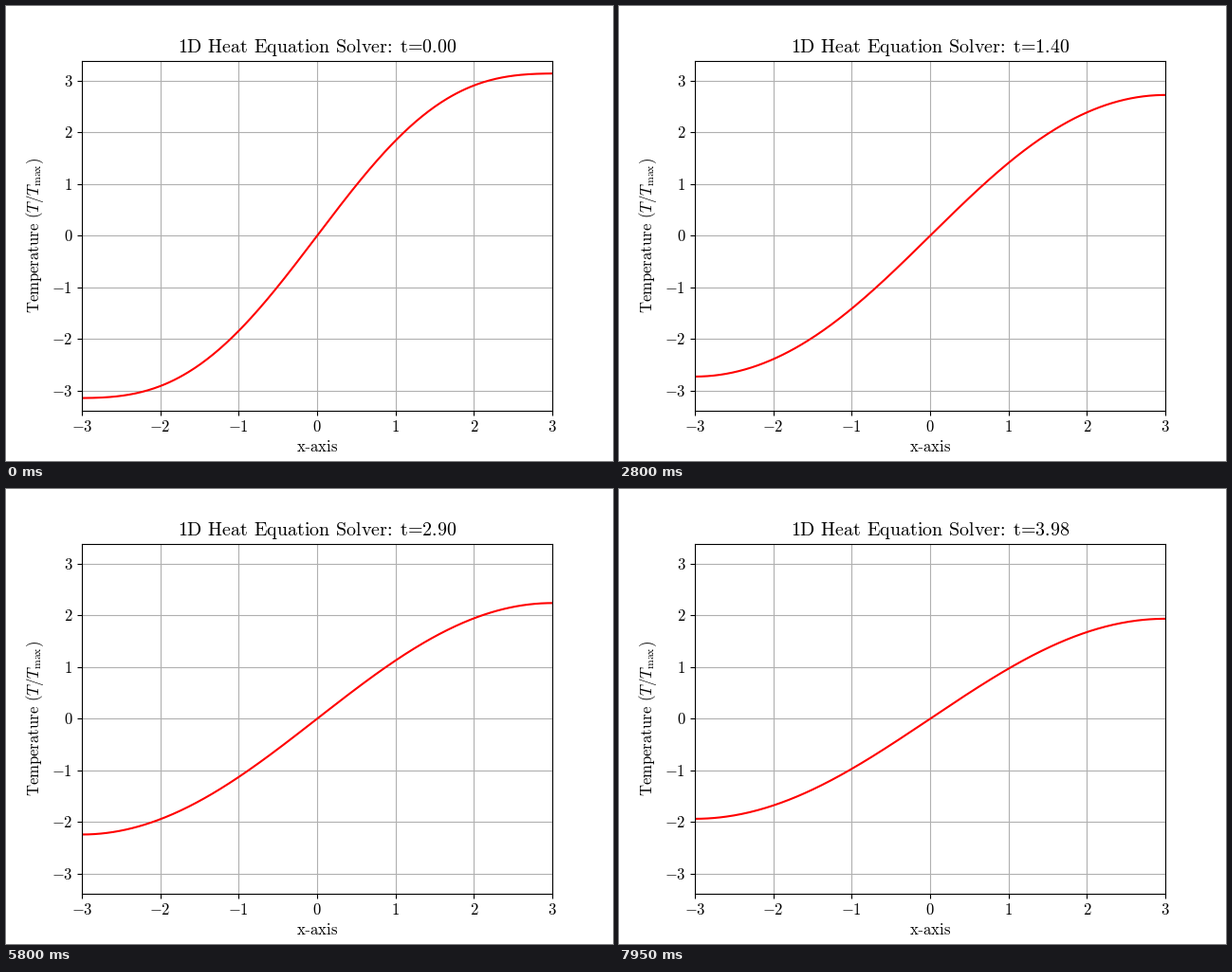
A matplotlib script for the animation above (8000 ms loop, 640x480 px).

```python
import numpy as np
import matplotlib.pyplot as plt
from matplotlib.animation import FuncAnimation
from matplotlib.ticker import FuncFormatter

plt.rcParams.update({
    "font.family": "Liberation Serif",
    "font.size": 12,
    "mathtext.fontset": "cm",
})

FRAMES = 160
STEP_MS = 50
L = 3.0        # half length of the rod
ALPHA = 0.5    # diffusivity
GAP = r"\hspace{0.38}"
TIGHT = r"\hspace{-0.2}"

x = np.linspace(-L, L, 301)

# Insulated ends: expand x + sin(x) in odd sine modes
n = np.arange(40)
k = (2 * n + 1) * np.pi / (2 * L)
coef = (2 / L) * (
    (-1.0) ** n / k**2
    + 0.5 * (np.sin((1 - k) * L) / (1 - k) - np.sin((1 + k) * L) / (1 + k))
)
modes = np.sin(np.outer(x, k))


def temperature(t):
    if t == 0:
        return x + np.sin(x)
    return modes @ (coef * np.exp(-ALPHA * k**2 * t))


def roman(text):
    return r"\mathrm{" + text.replace(" ", GAP) + "}"


def title_text(t):
    colon = TIGHT + ":" + r"\hspace{0.306}"
    equals = TIGHT + "=" + TIGHT
    return "$" + roman(f"1D Heat Equation Solver{colon}t{equals}{t:.2f}") + "$"


fig, ax = plt.subplots(figsize=(6.4, 4.8), dpi=100)
ax.set_xlim(-L, L)
ax.set_ylim(-3.391, 3.391)
ax.grid(True)
ax.set_xlabel("$" + roman("x") + "$-$" + roman("axis") + "$")
ax.set_ylabel("$" + roman("Temperature ") + r"(T/T_{\mathrm{max}})$")
for axis in (ax.xaxis, ax.yaxis):
    axis.set_ticks(range(-3, 4))
    axis.set_major_formatter(FuncFormatter(lambda v, _: f"${v:.0f}$"))

line, = ax.plot(x, temperature(0), color="red", lw=1.5)
title = ax.set_title(title_text(0))


def update(i):
    t = i / 40
    line.set_ydata(temperature(t))
    title.set_text(title_text(t))
    return line, title


anim = FuncAnimation(fig, update, frames=FRAMES, interval=STEP_MS,
                     repeat=True, repeat_delay=0, blit=False)
plt.show()
```
